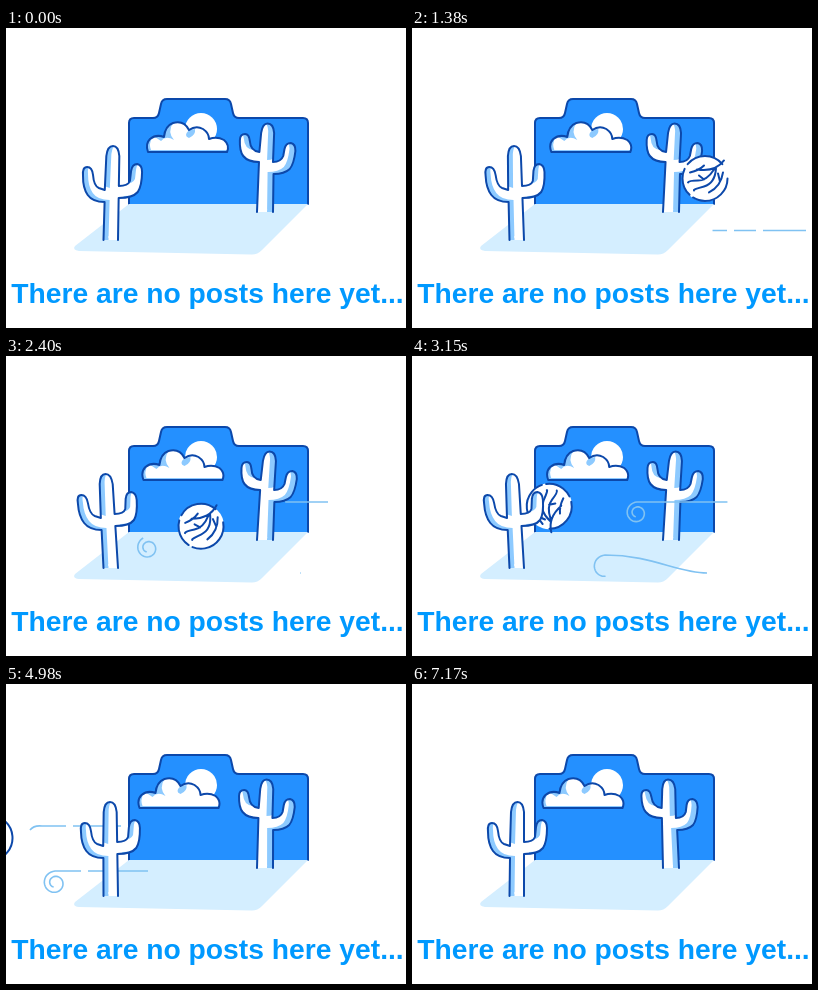
An HTML page for the animation above (7.2 s loop, 400 by 300 pixels).

```html
<!DOCTYPE html>
<html lang="en">
<head>
<meta charset="utf-8">
<title>No posts</title>
<style>
  html, body { margin: 0; width: 100%; height: 100%; overflow: hidden; background: #fff; }
  svg { display: block; width: 400px; height: 300px; }
  .ink { fill: none; stroke: #0c48aa; stroke-width: 2; stroke-linecap: round; stroke-linejoin: round; }
  .wind { fill: none; stroke: #80c2f2; stroke-width: 1.6; }
  text { font: bold 28.25px "Liberation Sans", Arial, sans-serif; fill: #0099ff; }
</style>
</head>
<body>
<svg id="stage" viewBox="0 0 400 300"></svg>
<script>
const LOOP = 7200, STEP = 30;
const stage = document.getElementById('stage');

const folder = 'M123 176V95Q123 90 128 90H147Q152 90 153 85L155 76Q156 71 161 71H219Q224 71 225 76L227 85Q228 90 233 90H297Q302 90 302 95V176';
const cloud = 'M142 124Q139 116 144 111Q150 106 158 109Q159 98 167 95Q178 92 183 102Q190 97 197 101Q203 105 203 111Q211 108 218 112Q224 117 221 124Z';
const cloudShade = 'M149 109Q158 106 159 102Q160 97 167 95Q161 104 168 112Q160 107 155 113ZM183 102Q177 108 183 110Q190 107 189 101Z';
const leftCactus = 'M97.5 212L98 174Q86 174 81 167Q76 160 76 148Q75 139 80 139Q85 139 86 147Q87 158 92 160L98 162L99 128Q100 118 105.5 118Q111 118 112 128V158Q121 158 123 153L124 143Q125 136 130 136Q135 137 135 144Q135 158 131 164Q126 170 112 170V212';
const rightCactus = 'M251 184V134Q240 134 235 128Q231 123 231 112Q231 106 236 106Q240 106 241 113Q242 123 251 124L252 105Q253 95.5 258 95.5Q264 95.5 265 105V134Q273 134 275 128L276 121Q277 115 282 115Q287 116 287 123Q286 136 282 141Q277 146 266 146L267 184';
const twigs = 'M19-18Q10-6-8-9M-15-6Q-6-8-1-13M9-9Q2 2-7 2T-17 4M11-10Q10 5-1 8T-11 12M-6-3L-1 1M18-6Q16 8 4 14M15 3L13-5';

// White shape with a pale blue edge on the side away from the offset.
const shaded = (id, d, dx, dy, extra) => `<g id="${id}">
  <clipPath id="${id}Clip"><path d="${d}"/></clipPath>
  <g clip-path="url(#${id}Clip)"><path d="${d}" fill="#8dcaff"/>
  <path d="${d}" fill="#fff" transform="translate(${dx} ${dy})"/>${extra}</g>
  <path d="${d}" class="ink"/></g>`;

function spiral(cx, cy, r) {
  let d = '';
  for (let i = 0; i <= 48; i++) {
    const a = -Math.PI / 2 - i / 48 * 2.9 * Math.PI, q = r * (1 - 0.65 * i / 48);
    d += `L${(cx + q * Math.cos(a)).toFixed(1)} ${(cy + q * Math.sin(a)).toFixed(1)}`;
  }
  return d;
}

// Head and tail times of each gust, and breaks along its length.
const winds = [
  { d: 'M394 202.5H225', head: [700, 1970], tail: [1500, 2200], gaps: [43, 72] },
  { d: 'M290 181H142' + spiral(142, 192, 11.5), head: [1400, 2250], tail: [1700, 2800], gaps: [50] },
  { d: 'M322 146H225' + spiral(225, 157, 11), head: [2050, 3100], tail: [3000, 4250], gaps: [] },
  { d: 'M295 217C265 217 240 199 193 199' + spiral(193, 211, 12), head: [2360, 3500], tail: [3250, 4500], gaps: [] },
  { d: 'M142 187H49' + spiral(49, 199, 12), head: [4150, 4950], tail: [5000, 5900], gaps: [60] },
  { d: 'M115 142H36Q28 141 24 146', head: [4250, 4950], tail: [5000, 5700], gaps: [48] }
];

stage.innerHTML = `
  <path d="${folder}" fill="#2490ff"/><path d="${folder}" class="ink"/>
  <path d="M123 176H302L256 222Q251 227 245 226.5L73 223Q66 222 69 218Z" fill="#d4eeff"/>
  <circle cx="195" cy="101" r="16" fill="#fff"/>
  ${shaded('cloud', cloud, 3, -2, `<path d="${cloudShade}" fill="#8dcaff"/>`)}
  ${shaded('rightCactus', rightCactus, -6, -2, '<path d="M251 181h10v4h-10z" fill="#fff"/>')}
  <g id="weed"><circle r="23" fill="#fff"/>
    <circle r="22.5" class="ink" pathLength="100" stroke-dasharray="34 3 20 4 28 11"/>
    <path d="${twigs}" class="ink"/></g>
  ${winds.map(w => `<path d="${w.d}" class="wind"/>`).join('')}
  ${shaded('leftCactus', leftCactus, 5, -2, '<path d="M102.5 208h10v5h-10z" fill="#fff"/>')}
  <text x="5.2" y="275">There are no posts here yet...</text>`;

const part = id => document.getElementById(id);
const paths = stage.querySelectorAll('.wind');
winds.forEach((w, i) => { w.el = paths[i]; w.len = w.el.getTotalLength(); });

const times = [0, 1380, 2400, 3960, 4980, 5970, 7200];
const keys = {
  left: [1.5, -3.5, -6, -4.5, -1.5, 0, 0],
  right: [3.5, 4.5, 5.5, 5, 2.5, 0, -2],
  x: [426, 293, 195, 76, -16, -105, -215],
  turn: [480, 0, -370, -820, -1130, -1430, -1800]
};

// Smooth curve through the keys.
function at(v, t) {
  let i = 0;
  while (i < times.length - 2 && t >= times[i + 1]) i++;
  const slope = k => {
    const a = Math.max(k - 1, 0), b = Math.min(k + 1, v.length - 1);
    return (v[b] - v[a]) / (times[b] - times[a]);
  };
  const h = times[i + 1] - times[i], u = (t - times[i]) / h, n = 1 - u;
  return v[i] * (1 + 2 * u) * n * n + v[i + 1] * u * u * (3 - 2 * u)
    + h * (slope(i) * u * n * n - slope(i + 1) * u * u * n);
}

const ease = u => u * u * (3 - 2 * u);
const progress = ([a, b], t) => ease(Math.min(1, Math.max(0, (t - a) / (b - a))));

function trim(w, t) {
  const b = progress(w.head, t) * w.len, a = progress(w.tail, t) * w.len;
  w.el.style.display = b > a ? '' : 'none';
  const edges = [a];
  for (const g of w.gaps) if (g > a && g < b) edges.push(g, Math.min(g + 7, b));
  edges.push(b);
  const runs = edges.slice(1).map((e, i) => e - edges[i]);
  w.el.setAttribute('stroke-dasharray', [0, a, ...runs, 9999].join(' '));
}

// Lean a plant about its foot; amount is the shift at its top.
function lean(id, amount, foot, height) {
  const k = amount / height;
  part(id).setAttribute('transform', `matrix(1 0 ${-k} 1 ${k * foot} 0)`);
}

function draw(now) {
  const t = Math.floor(now % LOOP / STEP) * STEP;
  const drift = -10.5 * (1 - (1 - t / LOOP) ** 1.4);
  part('cloud').setAttribute('transform', `translate(${drift} 0)`);
  lean('leftCactus', at(keys.left, t), 212, 95);
  lean('rightCactus', at(keys.right, t), 184, 88);
  const hop = (t + 920) % 1600 / 1600;
  const y = 178 - 112 * hop * (1 - hop);
  part('weed').setAttribute('transform', `translate(${at(keys.x, t)} ${y}) rotate(${at(keys.turn, t)})`);
  winds.forEach(w => trim(w, t));
}

let start;
function frame(now) {
  start ??= now;
  draw(now - start);
  requestAnimationFrame(frame);
}
draw(0);
requestAnimationFrame(frame);
</script>
</body>
</html>
```
